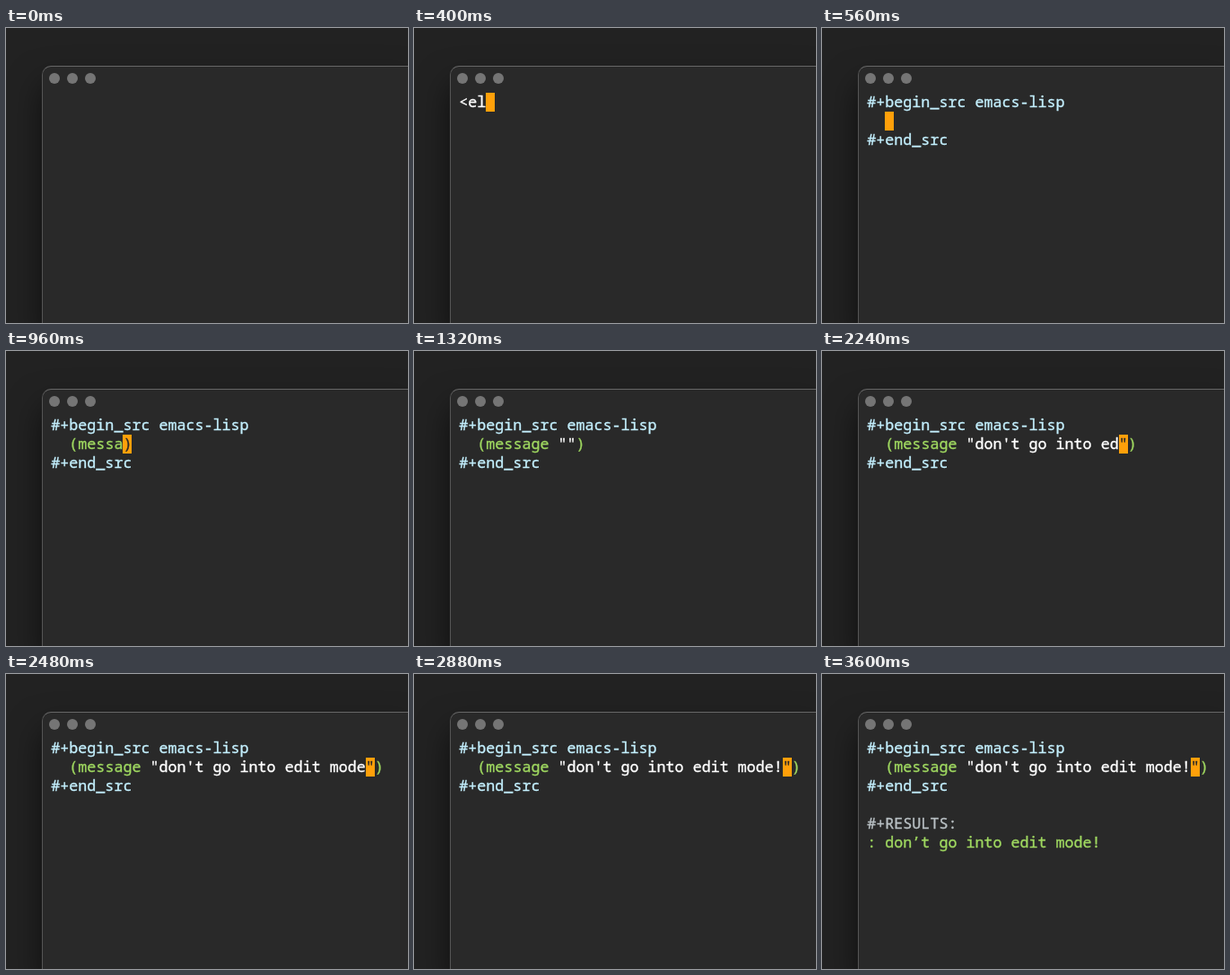
These frames come from a looping animation (448 px wide and 328 px high, 3640 ms). An HTML page:

```html
<!DOCTYPE html>
<html lang="en">
<head>
<meta charset="utf-8">
<title>Typing a source block</title>
<style>
  html, body { margin: 0; width: 100%; height: 100%; overflow: hidden; background: #222; }
  .window {
    position: absolute; left: 40px; top: 42px; right: 0; bottom: 0;
    border: solid #666; border-width: 1px 0 0 1px; border-left-color: #555; border-radius: 10px 0 0 0;
    background: #292929; box-shadow: 0 20px 36px rgba(0, 0, 0, .55);
  }
  .dot { position: absolute; top: 50px; width: 12px; height: 12px; border-radius: 50%; background: #757575; }
  pre {
    position: absolute; left: 50.3px; top: 71px; margin: 0;
    font: 16.7px/21px "Noto Sans Mono", monospace;
    font-variant-ligatures: none;
    -webkit-text-stroke: .35px;
  }
  .block { color: #c3effd; }
  .code { color: #9fd860; }
  .string { color: #fff; }
  .label { color: #b9c0c4; }
  .cursor {
    display: inline-block; position: relative; top: 1px; width: 10px; height: 21px;
    line-height: 19px; vertical-align: top; background: #ffa00a; color: #292929;
  }
</style>
</head>
<body>
<div class="window"></div>
<div class="dot" style="left:48px"></div>
<div class="dot" style="left:68px"></div>
<div class="dot" style="left:88px"></div>
<pre id="screen"></pre>
<script>
const LOOP = 3640, BLINK = 180, RESULT_AT = 3160;
const CALL = '(message ';

// Text, start and time per key in ms; the tab expands the abbreviation.
const bursts = [
  ['<el', 280, 40],
  ['\t', 560, 40],
  [CALL + '"', 720, 44],
  ["don't go int", 1440, 40],
  ['o e', 2040, 40],
  ['dit mode', 2240, 34],
  ['!', 2880, 40]
];

const screen = document.getElementById('screen');
const span = (kind, text) => `<span class="${kind}">${text.replace(/</g, '&lt;')}</span>`;

function typingAt(t) {
  let typed = '', lastKey = 80 - 2 * BLINK;
  for (const [text, start, pace] of bursts) {
    if (t < start) break;
    const count = Math.min(text.length, Math.floor((t - start) / pace) + 1);
    typed += text.slice(0, count);
    lastKey = start + (count - 1) * pace;
  }
  return { typed, cursorOn: Math.floor((t - lastKey) / BLINK) % 2 === 0 };
}

function render(t) {
  const { typed, cursorOn } = typingAt(t);
  const underCursor = (kind, char) => span(cursorOn ? 'cursor' : kind, char);
  const [abbrev, line] = typed.split('\t');
  if (line === undefined) return span('string', abbrev) + underCursor('string', ' ');

  const closing = !line ? underCursor('code', ' ')
    : line.length > CALL.length ? underCursor('string', '"') + span('code', ')')
    : underCursor('code', ')');

  return span('block', '#+begin_src emacs-lisp') + '\n  '
    + span('code', line.slice(0, CALL.length)) + span('string', line.slice(CALL.length)) + closing + '\n'
    + span('block', '#+end_src')
    + (t < RESULT_AT ? '' : '\n\n' + span('label', '#+RESULTS:')
      + '\n' + span('code', ': don’t go into edit mode!'));
}

let shown;
function tick() {
  const html = render(performance.now() % LOOP);
  if (html !== shown) screen.innerHTML = shown = html;
  requestAnimationFrame(tick);
}
tick();
</script>
</body>
</html>
```
